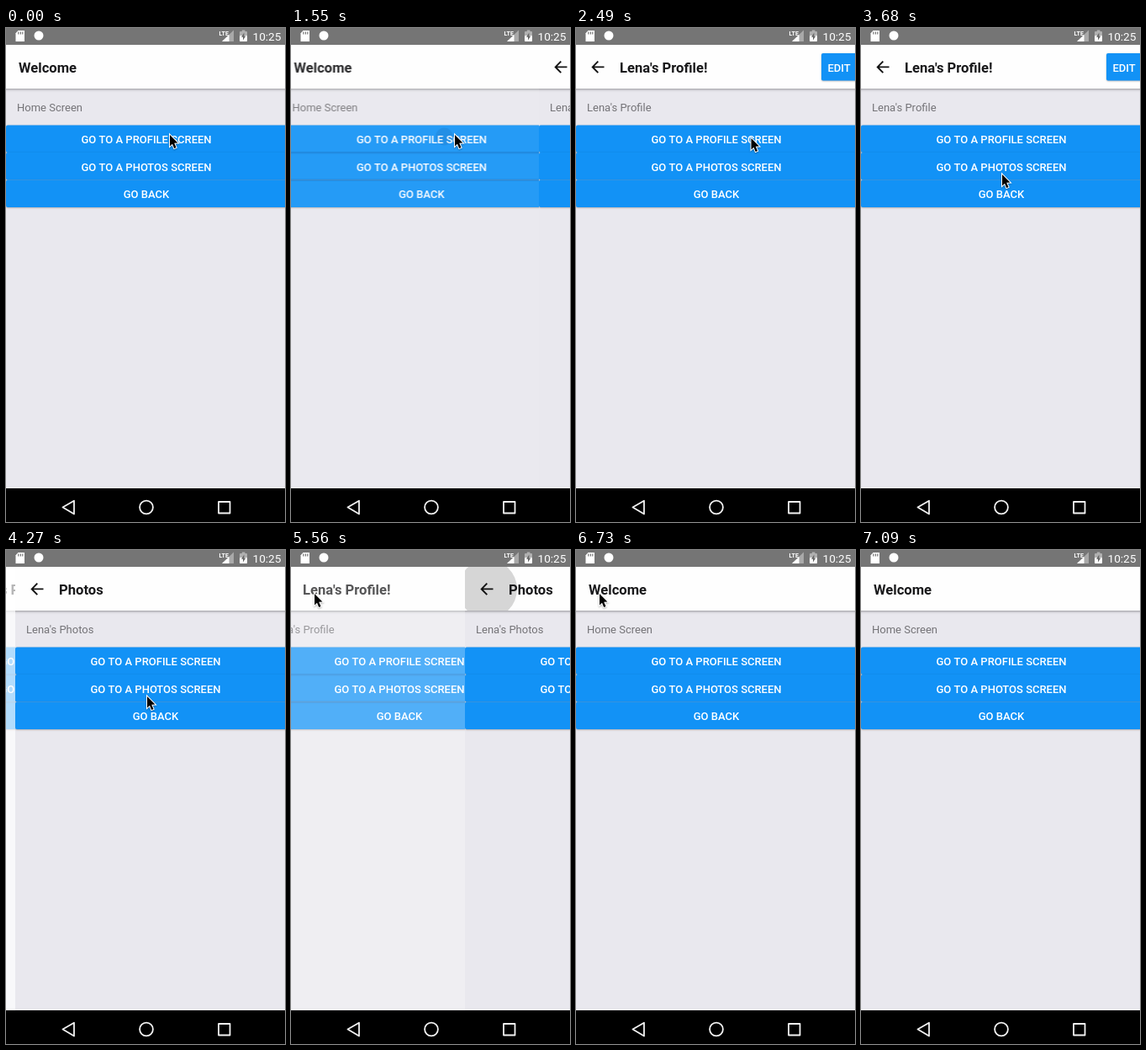
Animation, 332 px wide and 587 px high, one loop 7.69 s. Source, as an HTML page with a canvas:

```html
<!DOCTYPE html>
<html lang="en">
<head>
<meta charset="utf-8">
<title>Stack navigation</title>
<style>
  html, body { margin: 0; width: 100%; height: 100%; overflow: hidden; background: #000; }
  canvas { display: block; }
</style>
</head>
<body>
<canvas id="stage" width="332" height="587"></canvas>
<script>
const WIDTH = 332, HEIGHT = 587, CARD = 334, LOOP = 7690, SLIDE = 250;
const BLUE = '#1292f6', PAGE = '#e9e8ee';
const canvas = document.getElementById('stage');
const stage = canvas.getContext('2d');
const layer = document.createElement('canvas');
layer.width = CARD;
layer.height = HEIGHT;
const card = layer.getContext('2d');

const screens = {
  home: { title: 'Welcome', text: 'Home Screen' },
  profile: { title: "Lena's Profile!", text: "Lena's Profile", back: true, edit: true },
  photos: { title: 'Photos', text: "Lena's Photos", back: true }
};
const labels = ['GO TO A PROFILE SCREEN', 'GO TO A PHOTOS SCREEN', 'GO BACK'];

const slides = [
  { at: 1498, under: 'home', over: 'profile', tap: { x: 194, y: 129, row: 0 } },
  { at: 4041, under: 'profile', over: 'photos', tap: { x: 167, y: 174, row: 1 } },
  { at: 5422, under: 'profile', over: 'photos', pop: true },
  { at: 6470, under: 'home', over: 'profile', pop: true }
];

// Bursts of stepped motion: first step, last step, number of steps.
const bursts = [
  [1550, 2130, 6], [2370, 2490, 2], [3090, 3680, 6], [4030, 4740, 7],
  [4860, 4970, 2], [5450, 6030, 6], [6500, 7090, 6]
];

// Pointer path: time, x, y.
const path = [
  [0, 195, 127], [2250, 195, 127], [2490, 208.5, 131], [2972, 208.5, 131],
  [3680, 168, 174], [4380, 168, 174], [4740, 31, 57], [4970, 28, 52],
  [6740, 28, 52], [6972, 230, 466], [7088, 345, 560]
];

const clamp = v => Math.min(1, Math.max(0, v));
const easeInOut = v => v < .5 ? Math.pow(2 * v, 1.67) / 2 : 1 - Math.pow(2 - 2 * v, 1.67) / 2;

function stepTime(t) {
  let result = 0;
  for (const [start, end, steps] of bursts) {
    if (t < start) break;
    const gap = (end - start) / (steps - 1);
    result = start + Math.min(steps - 1, Math.floor((t - start + 8) / gap)) * gap;
  }
  return result;
}

function pointerAt(t) {
  for (let i = 1; i < path.length; i++) {
    const [t0, x0, y0] = path[i - 1], [t1, x1, y1] = path[i];
    if (t <= t1) {
      const k = clamp((t - t0) / (t1 - t0));
      return [x0 + (x1 - x0) * k, y0 + (y1 - y0) * k];
    }
  }
  return path[path.length - 1].slice(1);
}

function box(c, x, y, w, h, color, radius = 0) {
  c.fillStyle = color;
  c.beginPath();
  c.roundRect(x, y, w, h, radius);
  c.fill();
}

function disc(c, x, y, r, color) {
  c.fillStyle = color;
  c.beginPath();
  c.arc(x, y, r, 0, Math.PI * 2);
  c.fill();
}

function shape(c, points, close) {
  c.beginPath();
  points.forEach(([x, y]) => c.lineTo(x, y));
  if (close) c.closePath();
}

function write(c, text, x, y, font, color, align = 'left') {
  c.font = font + ' Roboto, sans-serif';
  c.fillStyle = color;
  c.textAlign = align;
  c.fillText(text, x, y);
}

function raised(c, x, y, w, h) {
  c.save();
  c.shadowColor = 'rgba(0,0,0,.3)';
  c.shadowBlur = 2;
  c.shadowOffsetY = .7;
  box(c, x, y, w, h, BLUE, 2);
  c.restore();
}

function ripple(c, area, x, y, r, color) {
  c.save();
  c.beginPath();
  c.rect(...area);
  c.clip();
  disc(c, x, y, r, color);
  c.restore();
}

function drawHeader(screen, controls, backRipple) {
  const c = card;
  c.save();
  c.shadowColor = 'rgba(0,0,0,.38)';
  c.shadowBlur = 3;
  c.shadowOffsetY = 1;
  box(c, -6, 14, CARD + 12, 58, '#fefefe');
  c.restore();
  if (backRipple) ripple(c, [0, 20, CARD, 52], 27, 46.5, backRipple, '#d6d6d6');
  write(c, screen.title, screen.back ? 52 : 15, 53, '700 16.6px', '#19191b');
  if (!controls) return;
  if (screen.back) {
    c.strokeStyle = '#111';
    c.lineWidth = 1.9;
    shape(c, [[26.3, 39.7], [19.7, 46.4], [26.3, 53.1]]);
    c.moveTo(19.7, 46.4);
    c.lineTo(33.5, 46.4);
    c.stroke();
  }
  if (screen.edit) {
    raised(c, 292, 30, 46, 32.5);
    write(c, 'EDIT', 299.5, 51.5, '500 13px', '#fff');
  }
}

function drawCard(name, x, { opacity = 1, controls = true, backRipple = 0, tap, tapSize } = {}) {
  const c = card, screen = screens[name];
  box(c, 0, 0, CARD, HEIGHT, PAGE);
  write(c, screen.text, 13, 99, '400 13px', '#747377');
  labels.forEach((label, row) => {
    const y = 115.5 + row * 32.5;
    raised(c, 0, y, CARD, 32.5);
    if (row && opacity < 1) box(c, 0, y - 1, CARD, 2.5, 'rgba(0,50,110,.16)');
    if (tap && tap.row === row) {
      ripple(c, [0, y, CARD, 32.5], tap.x, tap.y, tapSize, 'rgba(0,40,90,.12)');
    }
    write(c, label, 167, y + 21.5, '500 13px', '#fff', 'center');
  });
  drawHeader(screen, controls, backRipple);
  stage.globalAlpha = opacity;
  stage.drawImage(layer, x, 0);
  stage.globalAlpha = 1;
}

function drawScreens(t) {
  const slide = slides.filter(s => t >= s.at - 30).pop();
  if (!slide) return drawCard('home', 0);
  const { under, over, pop, tap } = slide;
  const age = t - slide.at;
  const moved = easeInOut(clamp(age / SLIDE));
  const cover = pop ? 1 - moved : moved;
  if (cover < 1) {
    drawCard(under, -.3 * CARD * cover, {
      opacity: 1 - .7 * cover, tap, tapSize: Math.max(4, age * .2)
    });
  }
  if (cover > 0) {
    drawCard(over, Math.round(CARD * (1 - cover)), {
      controls: cover > .3 || pop,
      backRipple: pop ? Math.min(35, 19 + age * .115) : 0
    });
  }
}

function drawStatusBar() {
  const c = stage;
  box(c, 0, 0, WIDTH, 20, '#757575');
  // memory card
  c.fillStyle = '#fff';
  shape(c, [[14.5, 3], [22, 3], [22, 16], [11.5, 16], [11.5, 6.2]], true);
  c.fill();
  [14.2, 16.8, 19.2].forEach(x => box(c, x, 4.5, 1.2, 3, '#757575'));
  disc(c, 39, 9, 5.5, '#fff');
  // signal
  c.fillStyle = '#a9a9a9';
  shape(c, [[271, 2.5], [271, 16], [257, 16]], true);
  c.fill();
  c.fillStyle = '#fff';
  shape(c, [[265.5, 8], [265.5, 16], [257, 16]], true);
  c.fill();
  write(c, 'LTE', 253.5, 8.5, '700 7px', '#fff');
  // battery
  box(c, 280.8, 2.5, 3.6, 2, '#b0b0b0');
  box(c, 278, 4, 9, 12, '#b0b0b0', 1);
  box(c, 278, 9, 9, 7, '#fff', 1);
  c.fillStyle = '#666';
  shape(c, [[283.4, 5.5], [280, 10.8], [282, 10.8], [282, 14.5], [285.3, 9.4], [283.4, 9.4]], true);
  c.fill();
  write(c, '10:25', 293.5, 14.5, '400 13.6px', '#fff');
}

function drawNavBar() {
  const c = stage;
  box(c, 0, 547, WIDTH, 40, '#000');
  c.strokeStyle = '#f2f2f2';
  c.lineWidth = 1.8;
  c.lineJoin = 'round';
  shape(c, [[67.5, 569.5], [81, 561.8], [81, 577.5]], true);
  c.stroke();
  c.beginPath();
  c.arc(167, 569.5, 7.9, 0, Math.PI * 2);
  c.stroke();
  c.strokeRect(253, 563, 13.5, 13.5);
}

function drawPointer(x, y) {
  const c = stage;
  c.save();
  c.translate(x, y);
  shape(c, [[0, 0], [0, 13.5], [3, 10.7], [5.2, 16], [7.5, 15], [5.2, 9.8], [9.4, 9.6]], true);
  c.shadowColor = 'rgba(0,0,0,.3)';
  c.shadowBlur = 2;
  c.shadowOffsetY = 1;
  c.strokeStyle = '#fff';
  c.lineWidth = 2;
  c.lineJoin = 'miter';
  c.stroke();
  c.shadowColor = 'transparent';
  c.fillStyle = '#000';
  c.fill();
  c.restore();
}

function frame() {
  const t = stepTime(performance.now() % LOOP);
  box(stage, 0, 0, WIDTH, HEIGHT, '#fff');
  drawScreens(t);
  drawStatusBar();
  drawNavBar();
  if (t < 7080) drawPointer(...pointerAt(t));
  requestAnimationFrame(frame);
}
frame();
</script>
</body>
</html>
```
